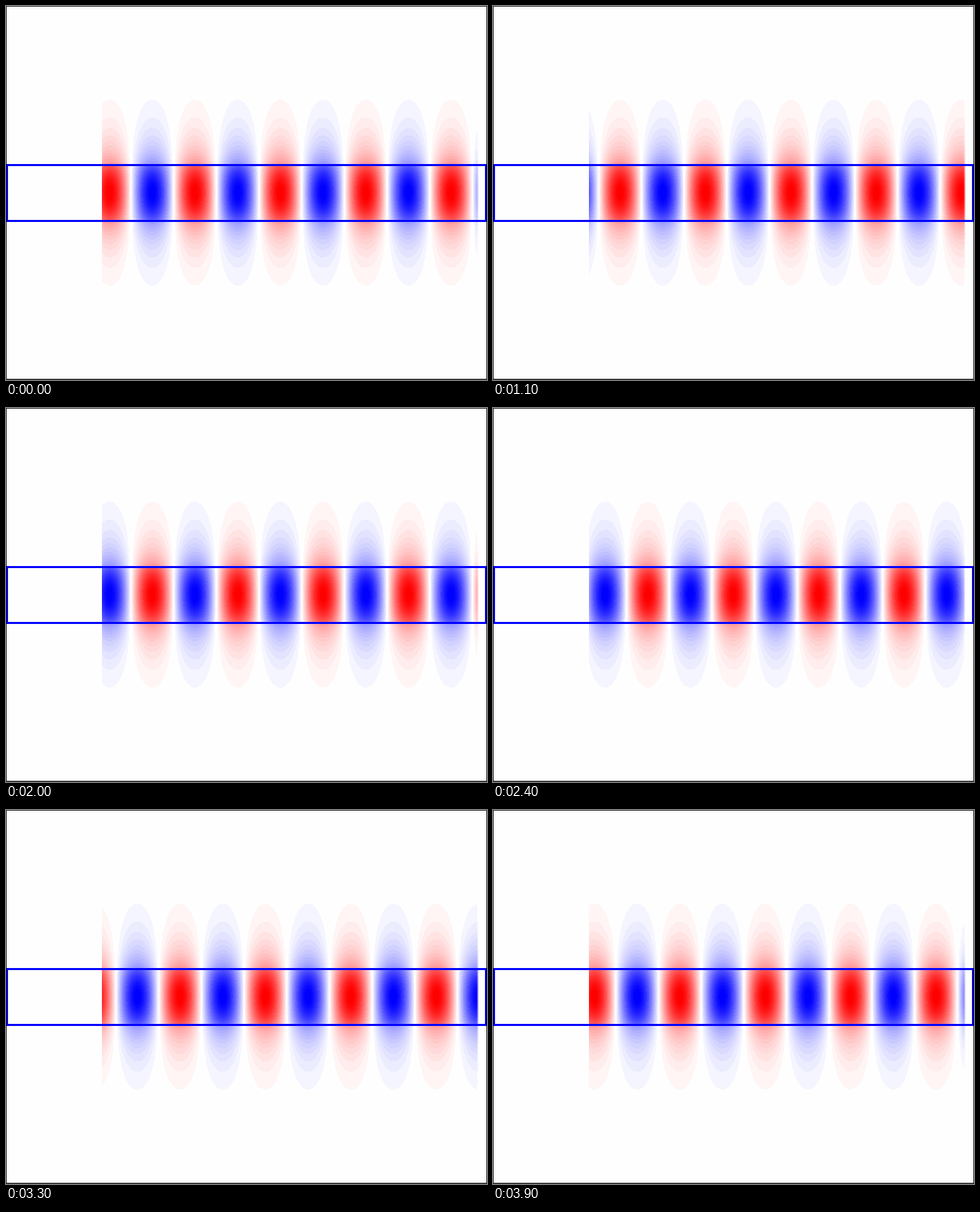
Recreate the animation shown at these times as a matplotlib script. Size 707 by 549 pixels, loop 4000 ms.

```python
import numpy as np
import matplotlib.pyplot as plt
from matplotlib.animation import FuncAnimation
from matplotlib.patches import Rectangle

W, H, DPI = 707, 549, 100
FRAMES, INTERVAL = 40, 100
WAVELENGTH = 125.5
FIRST_CREST = 152.3
X_START, X_END = 141, 695
CENTER_Y, HALF_CORE = 274.0, 41.0
CLADDING_RATIO = 2 / 3
BANDS = 30
PAPER = 254 / 255
BLUE = (0, 0, PAPER)

x = np.arange(W) + 0.5
y = np.arange(H) + 0.5

# Slab mode: cosine in the core, weaker exponential tail in the cladding
u = 0.887
w = u * np.tan(u)
d = np.abs(y - CENTER_Y) / HALF_CORE
profile = np.where(d < 1, np.cos(u * np.minimum(d, 1)),
                   CLADDING_RATIO * np.cos(u) * np.exp(-w * (d - 1)))

# Hard edge on the left, short ramp on the right
window = (x > X_START) * np.clip((X_END - x) / 3, 0, 1)


def field_image(i):
    crest = FIRST_CREST + WAVELENGTH * i / FRAMES
    wave = np.cos(2 * np.pi * (x - crest) / WAVELENGTH) * window
    field = np.outer(profile, wave)
    level = np.minimum(np.floor(np.abs(field) * BANDS), BANDS - 1) / (BANDS - 1)
    pale = PAPER * (1 - level)
    lit = np.where(level > 0, 1.0, PAPER)
    red = np.where(field > 0, lit, pale)
    blue = np.where(field < 0, lit, pale)
    return np.dstack([red, pale, blue])


fig = plt.figure(figsize=(W / DPI, H / DPI), dpi=DPI)
ax = fig.add_axes([0, 0, 1, 1])
ax.axis("off")
picture = ax.imshow(field_image(0), extent=(0, W, H, 0),
                    interpolation="nearest", aspect="auto")
ax.set_xlim(0, W)
ax.set_ylim(H, 0)


def bar(left, top, width, height, color, alpha=1):
    ax.add_patch(Rectangle((left, top), width, height, facecolor=color,
                           linewidth=0, alpha=alpha, zorder=3))


def outline(left, top, width, height, line, color, alpha=1):
    for edge in (top, top + height - line):
        bar(left, edge, width, line, color, alpha)
    for edge in (left, left + width - line):
        bar(edge, top + line, line, height - 2 * line, color, alpha)


outline(0, 232, W, 85, 3, BLUE)
outline(0, 0, W, H, 1, "black", 0.85)
bar(1, H - 2, W - 2, 1, "black", 0.6)


def update(i):
    picture.set_data(field_image(i))
    return [picture]


anim = FuncAnimation(fig, update, frames=FRAMES, interval=INTERVAL,
                     repeat=True, repeat_delay=0, blit=False)
plt.show()
```
